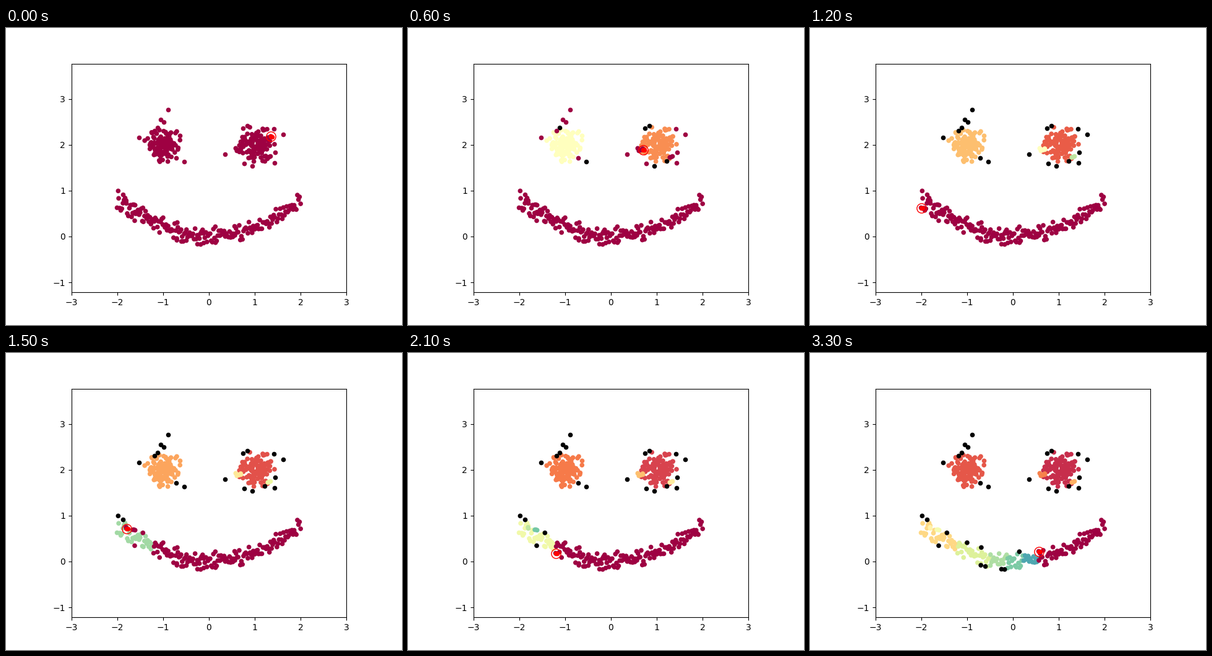
Recreate the animation shown at these times as a matplotlib script. Size 640x480 px, loop 3600 ms.

```python
import numpy as np
import matplotlib.pyplot as plt
from matplotlib.animation import FuncAnimation

W, H, DPI = 640, 480, 100
TOP, BOTTOM = 57.6, 427.2
UNIT, X0, Y0 = 74.08, 328, 336.95   # stage pixels per unit, position of (0, 0)
FRAMES, STEP = 12, 300
NEVER = 99
rng = np.random.default_rng(11)

# Stage positions of the first point of clusters 1, 2, ... (one per frame)
SEEDS = [(427, 175), (271, 186), (379, 196), (427, 207),
         (179, 290), (194, 283), (206, 285), (238, 323),
         (291, 343), (319, 347), (345, 335), (369, 320)]

# Eye outliers, by the frame in which they are marked as noise
OUTLIERS = {2: [(245, 161), (288, 216), (383, 162), (390, 158), (398, 223), (418, 215)],
            3: [(262, 132), (448, 172), (385, 219), (434, 218), (433, 163), (240, 166)],
            4: [(215, 177), (250, 148), (255, 152), (275, 210), (354, 204), (435, 201)]}
ABOVE = [-1.98, -1.87, -1.44, -1.0, -0.69, 0.14]
BELOW = [-1.62, -0.7, -0.6, -0.25, -0.18]


def to_data(p):
    """Pixel positions to axis units, measured at the pixel's centre."""
    x, y = np.asarray(p, float).reshape(-1, 2).T + 0.5
    return np.column_stack([(x - X0) / UNIT, (Y0 - y) / UNIT])


def blob(center, n, spread, reach):
    """Normal cloud kept inside a radius."""
    p = rng.normal(0, spread, (n * 4, 2))
    return (p[np.hypot(*p.T) < reach] + center)[:n]


def smile(x, offset):
    x = np.asarray(x)
    return np.column_stack([x, 0.2 * x ** 2 + offset])


seeds = to_data(SEEDS)
points, labels, noise_from = [], [], []


def add(new, label, noise=NEVER):
    """Add points with a cluster label and the frame they turn into noise."""
    points.extend(new)
    labels.extend(np.broadcast_to(label, len(new)))
    noise_from.extend(np.broadcast_to(noise, len(new)))


add(blob((1.03, 2), 120, 0.19, 0.43), 1)
add(blob((-1, 2), 120, 0.19, 0.43), 2)

# The smile is scanned left to right; each new cluster starts at a seed
n = 170
curve = smile(np.linspace(-1.97, 2, n), np.clip(rng.normal(0, 0.09, n), -0.17, 0.17))
part = np.searchsorted(seeds[7:, 0], curve[:, 0])
add(curve, np.where(part == 0, 5, part + 7))

for label, size in ((3, 5), (4, 2), (6, 1), (7, 2)):
    add(blob(seeds[label - 1] - (0.04, 0), size, 0.05, 0.08), label)
add(seeds, np.arange(1, FRAMES + 1))

for frame, spots in OUTLIERS.items():
    add(to_data(spots), NEVER, frame)
for xs, offset in ((ABOVE, 0.21), (BELOW, -0.18)):
    add(smile(xs, offset), NEVER, 4 + np.searchsorted(seeds[4:, 0], xs))

points, labels, noise_from = map(np.array, (points, labels, noise_from))

fig = plt.figure(figsize=(W / DPI, H / DPI), dpi=DPI, facecolor="white")
ax = fig.add_axes([(X0 - 3 * UNIT) / W, 1 - BOTTOM / H, 6 * UNIT / W, (BOTTOM - TOP) / H])
ax.set_xlim(-3, 3)
ax.set_ylim((Y0 - BOTTOM) / UNIT, (Y0 - TOP) / UNIT)
ax.set_xticks(range(-3, 4))
ax.set_yticks(range(-1, 4))

cmap = plt.get_cmap("Spectral")
dots = ax.scatter(*points.T, s=20, zorder=2)
reds = ax.scatter([], [], s=20, color="red", zorder=3)
ring, = ax.plot([], [], "o", ms=11, mfc="none", mec="red", mew=1, zorder=4)


def draw(f):
    count = f + 2 + (f >= 2)       # unvisited, clusters, then noise
    shown = np.where(labels <= f, labels, 0)
    colors = cmap(shown / (count - 1))
    colors[noise_from <= f] = (0, 0, 0, 1)
    dots.set_facecolor(colors)
    dots.set_edgecolor(colors)
    reds.set_offsets([seeds[f], seeds[f] + (0.03, -0.01)])
    ring.set_data(seeds[f, :1], seeds[f, 1:])
    return dots, reds, ring


anim = FuncAnimation(fig, draw, frames=FRAMES, interval=STEP, repeat=True, repeat_delay=0)
plt.show()
```
